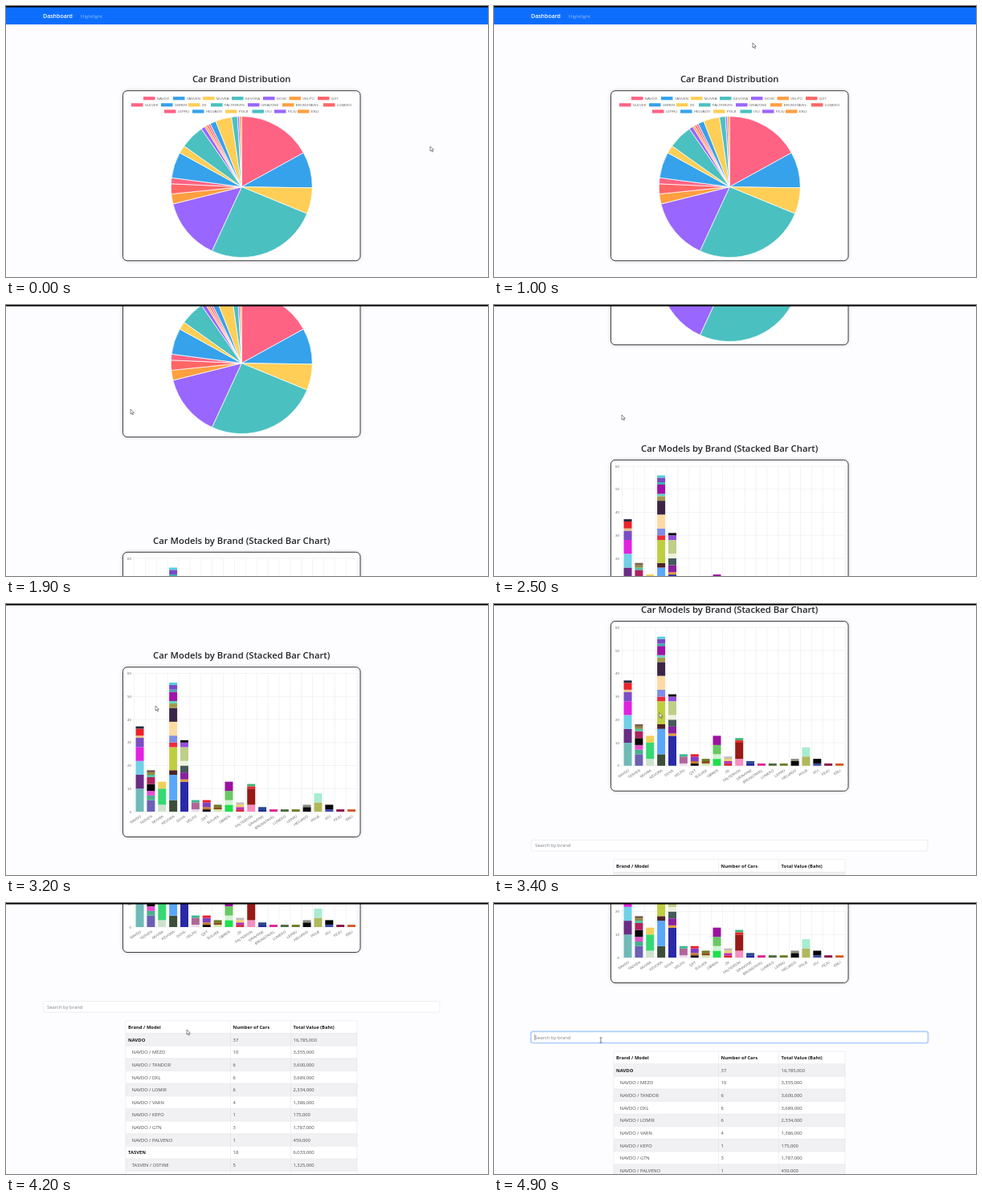
Animation of 600x338 px, one loop 5 s. Source, as an HTML page:

```html
<!DOCTYPE html>
<html lang="en">
<head>
<meta charset="utf-8">
<title>Dashboard</title>
<style>
  html, body { margin: 0; width: 100%; height: 100%; overflow: hidden; background: #fdfcfe; }
  svg { display: block; width: 100vw; height: 100vh; font-family: "Open Sans", "Noto Sans", sans-serif; }
  .chart { font: 4.4px "Liberation Sans", Arial, sans-serif; fill: #666; }
  .title { font-size: 11.3px; font-weight: 600; fill: #212529; text-anchor: middle; }
  .card { fill: #fff; stroke: #24262b; stroke-width: .9; filter: drop-shadow(0 .8px 2px rgba(0,0,0,.18)); }
  .cell { font-size: 5.8px; fill: #4a4d52; }
  .head { font-weight: 700; fill: #16181b; }
  .line { stroke: #dee2e6; stroke-width: .5; }
  .grid { stroke: #e7e7ec; stroke-width: .5; }
</style>
</head>
<body>
<svg id="stage" viewBox="0 0 600 338" preserveAspectRatio="none"></svg>
<script>
const LOOP = 5000, TICK = 100;
const stage = document.getElementById('stage');

function add(parent, tag, attrs, text) {
  const el = document.createElementNS('http://www.w3.org/2000/svg', tag);
  for (const k in attrs) el.setAttribute(k, attrs[k]);
  if (text !== undefined) el.textContent = text;
  parent.appendChild(el);
  return el;
}
const rect = (p, x, y, width, height, attrs) => add(p, 'rect', { x, y, width, height, ...attrs });
const label = (p, x, y, text, cls, attrs) => add(p, 'text', { x, y, class: cls, ...attrs }, text);
const line = (p, x1, y1, x2, y2, cls) => add(p, 'line', { x1, y1, x2, y2, class: cls });

// Each bar: name, then its parts from the bottom up as count#colour
const brands = [
  'NAVDO 10#6fbab7 6#6a2c84 6#70d0e6 6#e222e0 4#7a4cc6 1#e9c28e 3#ec2229 1#222c44',
  'TASVEN 5#6c60b4 2#46b08c 2#e650d0 3#0a0708 3#ae2260 1#50c4a8 1#8c8a3c 1#7c5c50',
  'MUVRA 3#cde2cd 7#36d874 3#f0d058',
  'KEVORA 5#3c4e38 11#5aa7fb 2#4e2226 10#bfce40 2#f02a3c 3#7f8de8 6#fbdba2 6#3a2548 2#a49a4c 1#60d6c0 4#a012a8 1#36b0a0 2#7a48c8 1#50d0d8',
  'DOVK 13#2a2aa6 1#e0a032 3#8a209e 3#465a5c 2#eef3de 6#bfce88 2#9050d8 1#0a0808',
  'VELPO 1#ecdcec 3#b0669a 1#38b890',
  'QXT 1#0c0808 1#c87a2c 2#8040c4 1#ee1c26',
  'SULVEK 1#d0e8b2 1#8a4a14 1#6c7c22',
  'OBREN 3#1ee04c 2#d0f4d0 4#6ac862 4#9a12a0',
  'ZK 1#d8283c 1#b032c0 1#f0d062 1#c4bcb4',
  'FALTERIVIN 3#f58fc0 7#971a16 1#ee2224 1#3cb478',
  'GRAVONE 1#1f2a9a 1#284a86',
  'BRUNSTAVEL 1#e0228c',
  'LUMEKO 1#4a6a3c',
  'LEPRU 1#6a7c24',
  'HELVADO 2#0a0a0a 1#8a8a80',
  'POLB 4#b0b85c 4#a8ecd0',
  'IXU 1#3848a8 2#080808',
  'FEJU 1#8a1048',
  'EBLI 1#d05a22'
].map((row, i) => {
  const [name, ...parts] = row.split(' ');
  const stack = parts.map(p => ({ n: parseInt(p, 10), color: p.slice(p.indexOf('#')) }));
  const hues = ['#ff6384', '#36a2eb', '#ffce56', '#4bc0c0', '#9966ff', '#ff9f40', '#ff6666'];
  return { name, stack, hue: hues[i % 7], total: stack.reduce((s, p) => s + p.n, 0) };
});

const page = add(stage, 'g', {});

function drawNav() {
  rect(page, 0, 0, 600, 23, { fill: '#0d6efd' });
  label(page, 46, 15.3, 'Dashboard', '', { fill: '#fff', 'font-size': 7, 'font-weight': 600 });
  label(page, 93, 15, 'Hightlight', '', { fill: '#fff', 'fill-opacity': .55, 'font-size': 5.95 });
}

function drawCard(title, titleY, top, height) {
  label(page, 293.2, titleY, title, 'title');
  rect(page, 145.5, top, 295.5, height, { rx: 5.5, class: 'card' });
}

function drawPie() {
  drawCard('Car Brand Distribution', 95, 105.7, 212);
  const rows = [
    [171, 208, 245, 281, 320, 352.5, 388],
    [156, 193, 227, 255, 301, 344, 395],
    [197, 232, 273, 306.5, 334, 363]
  ];
  let k = 0;
  rows.forEach((xs, r) => xs.forEach(x => {
    const y = 115.2 + r * 8.15, b = brands[k++];
    rect(page, x, y - 2.1, 14.5, 4.2, { fill: b.hue });
    label(page, x + 16.8, y + 1.6, b.name, 'chart');
  }));

  const cx = 293.3, cy = 225.6, R = 88;
  const sum = brands.reduce((s, b) => s + b.total, 0);
  const rim = n => {
    const a = n / sum * 2 * Math.PI;
    return `${cx + R * Math.sin(a)} ${cy - R * Math.cos(a)}`;
  };
  let from = 0;
  for (const b of brands) {
    const to = from + b.total;
    add(page, 'path', {
      d: `M${cx} ${cy}L${rim(from)}A${R} ${R} 0 0 1 ${rim(to)}Z`,
      fill: b.hue, stroke: '#fff', 'stroke-width': .75, 'stroke-linejoin': 'round'
    });
    from = to;
  }
}

function drawBars() {
  drawCard('Car Models by Brand (Stacked Bar Chart)', 450.7, 461.3, 211.7);
  const left = 159.6, step = 13.87, base = 641.5, unit = 2.875;
  for (let v = 0; v <= 60; v += 10) {
    const y = base - v * unit;
    line(page, left - 2.8, y, left + step * 20, y, 'grid');
    label(page, 156, y + 1.5, v, 'chart', { 'text-anchor': 'end' });
  }
  for (let i = 0; i <= 20; i++) {
    line(page, left + i * step, base - 60 * unit, left + i * step, base + 2.8, 'grid');
  }
  brands.forEach((b, i) => {
    const cx = left + (i + .5) * step;
    let y = base;
    for (const p of b.stack) {
      y -= p.n * unit;
      rect(page, cx - 5, y, 10, p.n * unit, { fill: p.color });
    }
    label(page, 0, 0, b.name, 'chart', {
      'text-anchor': 'end', transform: `translate(${cx + 2} ${base + 6.6}) rotate(-33)`
    });
  });
}

let box, glow, caret;
function drawSearch() {
  glow = rect(page, 44.8, 732.6, 496.6, 16.4, { rx: 3.6, fill: '#c2dbfe' });
  box = rect(page, 46.3, 734.1, 493.6, 13.6, { rx: 2.2, fill: '#fff', 'stroke-width': .6 });
  label(page, 51, 743, 'Search by brand', '', { 'font-size': 5.9, fill: '#7b8086' });
  caret = rect(page, 50.7, 737.2, .5, 7.4, { fill: '#222' });
}

function drawTable() {
  const top = 758.4, pitch = 15.65, cols = [149, 279.5, 354.5, 437];
  const [first, second] = brands;
  const rows = [
    ['Brand / Model', 'Number of Cars', 'Total Value (Baht)'],
    [first.name, '37', '16,785,000'],
    ['/ MEZO', '10', '3,355,000'],
    ['/ TANDOR', '6', '3,600,000'],
    ['/ DXL', '6', '3,689,000'],
    ['/ LOMIR', '6', '2,334,000'],
    ['/ VARN', '4', '1,386,000'],
    ['/ KEPO', '1', '175,000'],
    ['/ GTN', '3', '1,787,000'],
    ['/ PALVENO', '1', '459,000'],
    [second.name, '18', '6,033,000'],
    ['/ OSTINE', '5', '1,325,000'],
    []
  ];
  let owner = '';
  rows.forEach((row, r) => {
    const y = top + r * pitch;
    rect(page, cols[0], y, cols[3] - cols[0], pitch, { fill: r % 2 ? '#f1f0f2' : '#fff' });
    line(page, cols[0], y, cols[3], y, 'line');
    row.forEach((text, c) => {
      const sub = text.startsWith('/ ');
      if (c === 0 && !sub) owner = text;
      const bold = r === 0 || (c === 0 && !sub);
      label(page, cols[c] + (sub ? 7.8 : 3.1), y + 10, sub ? owner + ' ' + text : text,
        bold ? 'cell head' : 'cell');
    });
  });
  cols.forEach(x => line(page, x, top, x, top + rows.length * pitch, 'line'));
}

drawNav();
drawPie();
drawBars();
drawSearch();
drawTable();
rect(stage, 0, 0, 600, 1.6, { fill: '#000' });

const arrow = add(stage, 'path', {
  d: 'M0 0V6.1L1.5 4.8L2.5 7L3.5 6.6L2.5 4.4H4.4Z',
  fill: '#fff', stroke: '#333', 'stroke-width': .55, 'stroke-linejoin': 'round'
});
const beam = add(stage, 'path', {
  d: 'M-1.5 -3H-.4L0 -2.7L.4 -3H1.5M0 -2.7V2.7M-1.5 3H-.4L0 2.7L.4 3H1.5',
  fill: 'none', stroke: '#222', 'stroke-width': .6
});

// Time in ms, then values
const scrollSteps = [
  [0, 0], [1600, 0], [1700, 38], [1800, 92], [1900, 153], [2100, 153], [2400, 268],
  [2650, 268], [2950, 382.5], [3300, 382.5], [3500, 497], [3700, 611.5],
  [4350, 611.5], [4500, 573.4]
];
const pointerSteps = [
  [0, 528, 175], [600, 527, 206], [800, 455, 130], [1000, 322, 46], [1200, 118, 20],
  [1500, 128, 70], [1900, 155, 130], [2500, 159, 137], [3200, 186, 127],
  [3800, 245, 153], [4200, 225, 158], [4600, 133, 171]
];

function sample(steps, t) {
  const i = steps.findIndex(s => s[0] > t);
  if (i < 0) return steps[steps.length - 1].slice(1);
  const a = steps[i - 1], b = steps[i], k = (t - a[0]) / (b[0] - a[0]);
  return a.slice(1).map((v, j) => v + (b[j + 1] - v) * k);
}
const show = (el, on) => el.setAttribute('visibility', on ? 'visible' : 'hidden');

function draw(t) {
  const [scroll] = sample(scrollSteps, t);
  const [x, y] = sample(pointerSteps, t);
  const focus = t >= 4700, typing = t >= 4500;
  page.setAttribute('transform', `translate(0 ${-scroll})`);
  for (const el of [arrow, beam]) el.setAttribute('transform', `translate(${x} ${y})`);
  show(arrow, !typing);
  show(beam, typing);
  show(glow, focus);
  show(caret, focus);
  box.setAttribute('stroke', focus ? '#86b7fe' : '#dee2e6');
}

const start = performance.now();
function frame() {
  const t = (performance.now() - start) % LOOP;
  draw(Math.floor(t / TICK) * TICK);
  requestAnimationFrame(frame);
}
frame();
</script>
</body>
</html>
```
